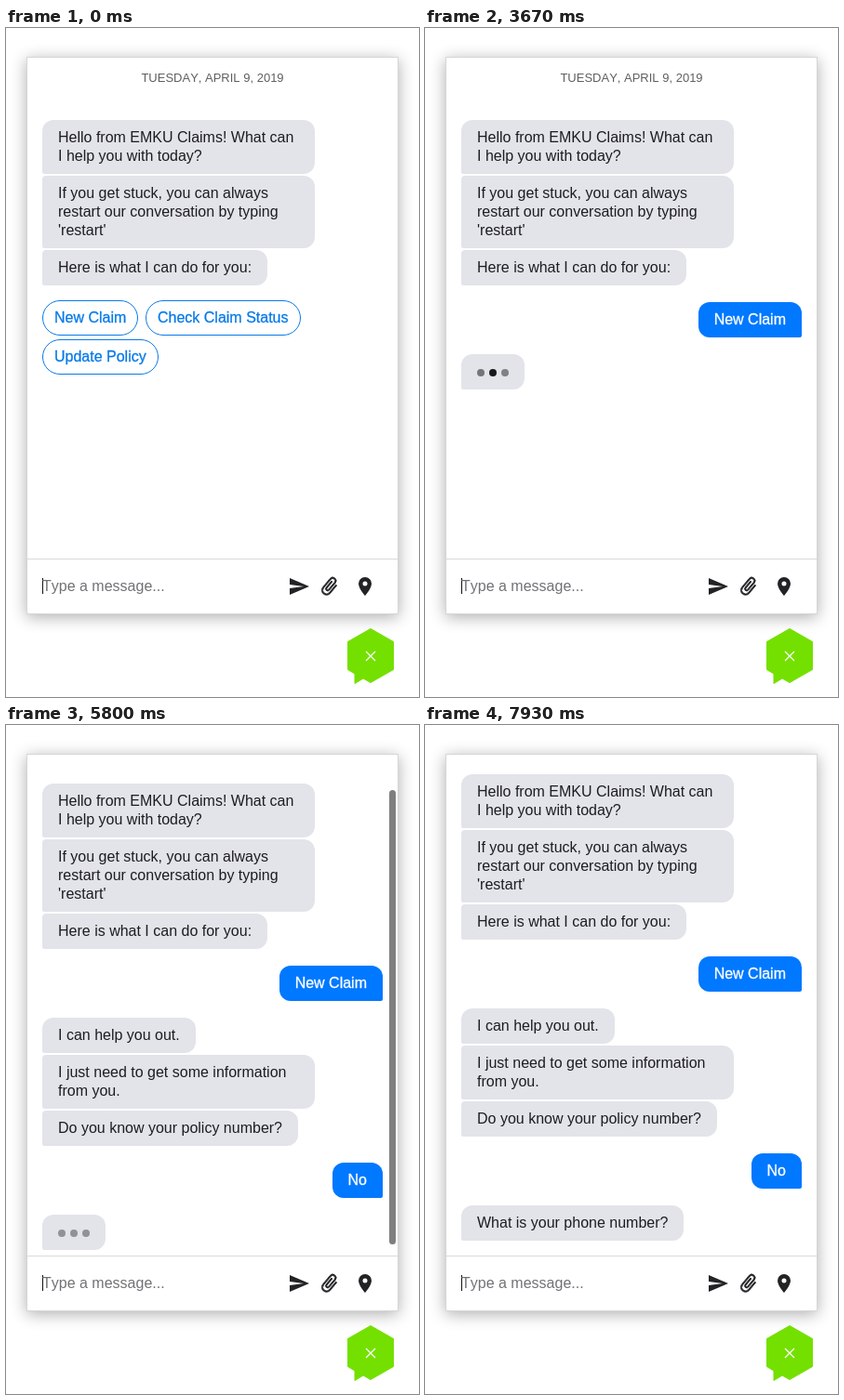
An HTML page that plays this animation: 444 px wide and 720 px high, repeating every 8000 ms.

```html
<!DOCTYPE html>
<html lang="en">
<head>
<meta charset="utf-8">
<title>Claims chat</title>
<style>
html, body { margin: 0; width: 100%; height: 100%; overflow: hidden; background: #fff; }
body { position: relative; font: 16px/20px "Liberation Sans", Arial, sans-serif; font-kerning: none; color: #1d1d20; }
body *, body *::before { box-sizing: border-box; }
.panel { position: absolute; left: 22px; top: 31px; width: 400px; height: 600px; background: #fff;
  border: 1px solid #d6d6d6; box-shadow: 0 3px 16px rgba(0, 0, 0, .32); }
.view { position: absolute; left: 23px; top: 32px; width: 398px; height: 539px; overflow: hidden; }
.list { position: absolute; left: -23px; top: -32px; width: 444px; height: 720px; }
.date { position: absolute; left: 0; right: 0; top: 44px; text-align: center; font-size: 13px; color: #5f5f63; }
.msg { position: absolute; left: 39px; padding: 9px 17px; white-space: pre; background: #e3e4ea;
  border-radius: 12px 12px 12px 2px; }
.msg.next { border-top-left-radius: 4px; }
.msg.wide { width: 293px; }
.msg.mine { left: auto; right: 39px; color: #fff; background: #0078ff; border-radius: 12px 12px 2px 12px; }
.mine, .pill { -webkit-text-stroke: .3px; }
.pill { position: absolute; padding: 8px 12px; border: 1px solid #087ae8; border-radius: 19px;
  color: #087ae8; background: #fff; white-space: pre; }
.dots { width: 68px; height: 38px; }
.dots i { position: absolute; top: 16px; width: 8px; height: 8px; border-radius: 50%; background: #17171a; }
.thumb { position: absolute; left: 412px; top: 34px; width: 7px; height: 489px; border-radius: 4px; background: #000; }
.input { position: absolute; left: 23px; top: 571px; width: 398px; height: 59px; border-top: 1px solid #dadada; }
.field { position: absolute; left: 39px; top: 591px; white-space: pre; }
.caret { display: inline-block; width: 1px; height: 17px; margin-right: -1px; vertical-align: -3px; background: #111; }
.hint { color: #727276; }
svg { position: absolute; left: 0; top: 0; }
</style>
</head>
<body>
<div class="panel"></div>
<div class="view"><div class="list" id="list"><div class="date">TUESDAY, APRIL 9, 2019</div></div></div>
<div class="thumb" id="thumb"></div>
<div class="input"></div>
<div class="field"><span id="typed"></span><span class="caret" id="caret"></span><span class="hint" id="hint">Type a message...</span></div>
<svg width="444" height="720" fill="#232326">
  <path transform="translate(303 589)" d="M2 21L23 12 2 3V10L17 12 2 14Z"/>
  <path transform="translate(348 601) rotate(40) scale(.96) translate(-12.5 -12)" stroke="#232326" stroke-width=".7"
    d="M16.5 6v11.5a4 4 0 0 1-8 0V5a2.5 2.5 0 0 1 5 0v10.5a1 1 0 0 1-2 0V6H10v9.5a2.5 2.5 0 0 0 5 0V5a4 4 0 0 0-8 0v12.5a5.5 5.5 0 0 0 11 0V6z"/>
  <path transform="translate(374 589)" fill-rule="evenodd"
    d="M12 2a7 7 0 0 0-7 7c0 5.25 7 13 7 13s7-7.75 7-13a7 7 0 0 0-7-7zm0 4.5a2.5 2.5 0 1 1 0 5a2.5 2.5 0 1 1 0-5z"/>
  <path fill="#74e000" stroke="#74e000" stroke-linejoin="round" d="M392 646.5L416.5 660.5V690.5L392 704.5L384 700L375 705.5V695L367.5 690.5V660.5Z"/>
  <path stroke="#fff" stroke-width="1.3" d="M387 671l10 10m0-10l-10 10"/>
</svg>
<script>
const LOOP = 8000;
const SEND_1 = 2480, TYPING_1 = 2600, REPLY_1 = 3870;
const SEND_2 = 5480, TYPING_2 = 5660, REPLY_2 = 7270;
const $ = id => document.getElementById(id);
const list = $('list'), thumb = $('thumb'), typed = $('typed'), caret = $('caret'), hint = $('hint');
const timed = [];

function add(cls, y, text, from = 0, to = LOOP, x) {
  const el = document.createElement('div');
  el.className = cls;
  el.style.top = y + 'px';
  if (x) el.style.left = x + 'px';
  el.textContent = text;
  list.append(el);
  timed.push({ el, from, to });
  return el;
}

function addDots(y, from, to) {
  const el = add('msg dots', y, '', from, to);
  const dots = [17, 30, 43].map(x => {
    const dot = document.createElement('i');
    dot.style.left = x + 'px';
    el.append(dot);
    return dot;
  });
  return { dots, from };
}

add('msg wide', 99, 'Hello from EMKU Claims! What can\nI help you with today?');
add('msg wide next', 159, "If you get stuck, you can always\nrestart our conversation by typing\n'restart'");
add('msg next', 239, 'Here is what I can do for you:');
add('pill', 293, 'New Claim', 0, SEND_1, 39);
add('pill', 293, 'Check Claim Status', 0, SEND_1, 150);
add('pill', 335, 'Update Policy', 0, SEND_1, 39);
add('msg mine', 295, 'New Claim', SEND_1);
add('msg', 351, 'I can help you out.', REPLY_1);
add('msg wide next', 391, 'I just need to get some information\nfrom you.', REPLY_1 + 200);
add('msg next', 451, 'Do you know your policy number?', REPLY_1 + 400);
add('pill', 505, 'Yes', REPLY_1 + 400, SEND_2, 39);
add('pill', 505, 'No', REPLY_1 + 400, SEND_2, 99);
add('msg mine', 507, 'No', SEND_2);
add('msg', 563, 'What is your phone number?', REPLY_2);
const indicators = [addDots(351, TYPING_1, REPLY_1), addDots(563, TYPING_2, REPLY_2)];

// Key times per typed message; the field clears on send.
const entries = [
  { text: 'New Claim', keys: [1000, 1110, 1200, 1800, 1870, 1970, 2070, 2170, 2250], send: SEND_1 },
  { text: 'No', keys: [4930, 5070], send: SEND_2 }
];
const caretResets = [0, ...entries.flatMap(e => [...e.keys, e.send])];

const clamp = p => Math.min(1, Math.max(0, p));
const smooth = p => p * p * (3 - 2 * p);
const ease = p => smooth(1 - (1 - p) ** 1.8);

// Opacity of one dot: a 1 s pulse after its delay.
function pulse(ms) {
  if (ms < 0) return .4;
  const p = ms % 1000 / 500;
  return p < 1 ? .4 + .6 * ease(p) : 1 - .6 * ease(p - 1);
}

function render(t) {
  for (const { el, from, to } of timed) el.style.visibility = t >= from && t < to ? 'visible' : 'hidden';
  for (const { dots, from } of indicators)
    dots.forEach((dot, i) => dot.style.opacity = pulse(t - from - (i + 1) * 333.3));

  const scroll = 46 * smooth(clamp((t - TYPING_2) / 200));
  list.style.transform = `translateY(${-Math.round(scroll)}px)`;
  thumb.style.transform = `translateY(${Math.round(scroll)}px)`;
  thumb.style.opacity = t < TYPING_2 ? 0 : .5 * (1 - clamp((t - 6530) / 270));

  const entry = entries.find(e => t < e.send);
  const text = entry ? entry.text.slice(0, entry.keys.filter(k => t >= k).length) : '';
  if (typed.textContent !== text) typed.textContent = text;
  hint.style.visibility = text ? 'hidden' : 'visible';
  const since = t - Math.max(...caretResets.filter(k => k <= t));
  caret.style.visibility = since % 1000 < 500 ? 'visible' : 'hidden';
}

const start = performance.now();
function tick() {
  render((performance.now() - start) % LOOP);
  requestAnimationFrame(tick);
}
tick();
</script>
</body>
</html>
```
